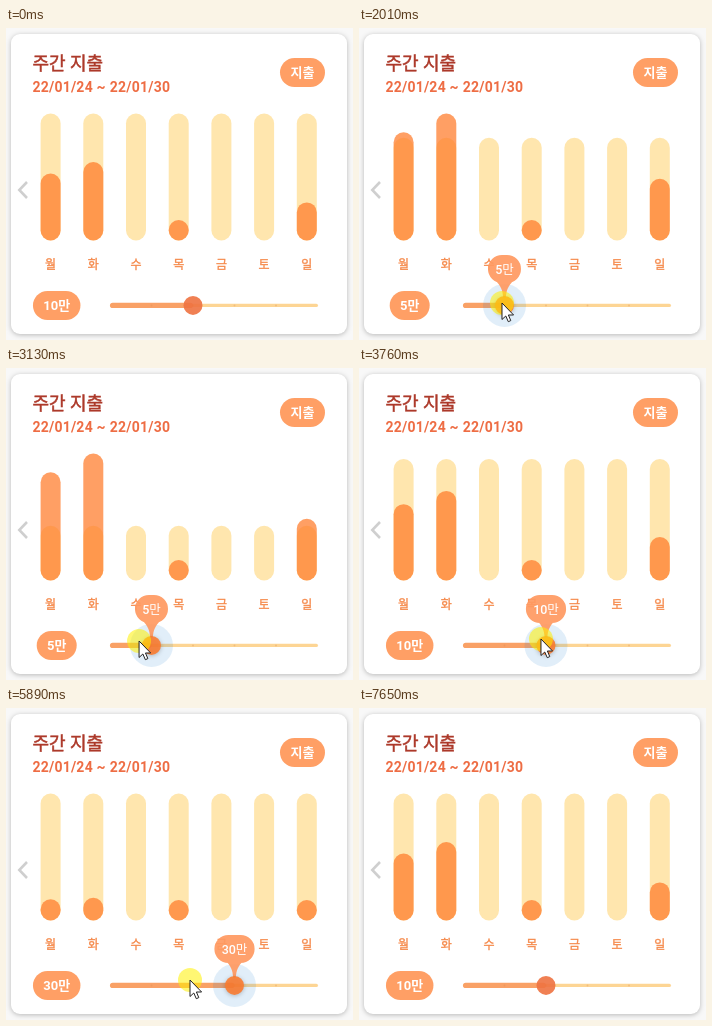
An HTML page that plays this animation: 347 by 312 pixels, repeating every 8.15 s.

```html
<!DOCTYPE html>
<html lang="ko">
<head>
<meta charset="utf-8">
<title>주간 지출</title>
<style>
  html, body { margin: 0; width: 100%; height: 100%; overflow: hidden; background: #f8f8f8; }
  svg { display: block; width: 347px; height: 312px; }
  text { font-family: Roboto, "Noto Sans CJK KR", "Noto Sans CJK", sans-serif; font-weight: 500; }
  .mid { text-anchor: middle; }
  .pill { fill: #ff9f65; }
  .white { fill: #fff; font-size: 13px; }
  .bold { font-weight: 700; }
  .card { fill: #fff; filter: drop-shadow(0 1.5px 2.5px rgba(0, 0, 0, .26)); }
  .title { fill: #ad3a2b; stroke: #ad3a2b; stroke-width: .5px; font-size: 18px; }
  .day { fill: #f58a4c; stroke: #f58a4c; stroke-width: .35px; font-size: 12px; }
  .back { fill: #ffe6ae; }
  .fill { fill: rgba(255, 122, 41, .72); }
  .thumb { fill: #ee7240; fill-opacity: .9; }
  .thumb.held { fill: #f97b30; filter: drop-shadow(0 1px 2px rgba(0, 0, 0, .25)); }
</style>
</head>
<body>
<svg viewBox="0 0 347 312">
  <rect class="card" x="5" y="6" width="336" height="300" rx="9"/>
  <text class="title" x="26.4" y="42">주간 지출</text>
  <text class="bold" x="26.4" y="64" font-size="14" letter-spacing=".23" fill="#ee6d44">22/01/24 ~ 22/01/30</text>
  <rect class="pill" x="274" y="30" width="45" height="29" rx="14.5"/>
  <text class="mid white bold" x="296.5" y="49">지출</text>
  <path d="M21 154L13.3 162L21 170" fill="none" stroke="#cfcfcf" stroke-width="2.6"/>
  <g id="bars"></g>

  <rect id="pill" class="pill" y="263" height="29" rx="14.5"/>
  <text id="limit" class="mid white bold" x="50.7" y="281.7"></text>

  <rect x="104" y="275.7" width="208" height="3.4" rx="1.7" fill="#fdd594"/>
  <rect id="track" x="104" y="274.7" height="5.4" rx="2.7" fill="#f9a166"/>
  <g id="ticks" fill="#d98a4a" opacity=".3"></g>
  <circle id="halo" cy="277.4" fill="#1d7fd0" fill-opacity=".13"/>
  <g id="bubble" opacity=".93">
    <path id="drop" fill="#ff9a62"/>
    <text id="tip" class="mid white" y="-31.7" style="font-size:12.5px"></text>
  </g>
  <circle id="thumb" cy="277.4" r="9.5"/>

  <g id="cursor">
    <circle r="12" fill="#fff000" fill-opacity=".55"/>
    <path d="M0 0V16.5L3.8 13L6.3 18.7L8.8 17.6L6.4 12H11.6Z" fill="#fff" stroke="#222" stroke-linejoin="round"/>
  </g>
</svg>
<script>
const LOOP = 8150, STEP = LOOP / 65;
const PRESS = 690, RELEASE = 6580, LAG = 80, POP = 120, FADE = 300;
const LEFT = 104, GAP = 41.5, FULL = 127, BASE = 212.5, PEAK = 6.18;
const LIMITS = [1, 5, 10, 30, 50, 100];
const SPENT = { 월: 5.27, 화: PEAK, 수: 0, 목: .5, 금: 0, 토: 0, 일: 3 };

// [time, x, y] where the pointer turns or changes speed
const PATH = [[250, 252, 308], [560, 188, 278], [800, 186, 276], [1700, 145, 276], [2006, 143, 275],
  [2290, 118, 274], [2760, 118, 274], [3134, 133, 273], [3440, 166, 272], [3762, 182, 271],
  [5015, 284, 278], [5330, 312, 277], [5517, 308, 275], [5893, 184, 272], [6780, 187, 276], [7640, 240, 330]];

const $ = id => document.getElementById(id);
const mix = (a, b, p) => a + (b - a) * p;
const clamp = (v, lo = 0, hi = 1) => Math.max(lo, Math.min(hi, v));
const set = (el, attrs) => { for (const k in attrs) el.setAttribute(k, attrs[k]); };

function add(parent, tag, attrs) {
  const el = document.createElementNS('http://www.w3.org/2000/svg', tag);
  set(el, attrs);
  return parent.appendChild(el);
}

function pointer(t) {
  const i = PATH.findIndex(p => p[0] > t);
  if (i < 1) return null;
  const [t0, x0, y0] = PATH[i - 1], [t1, x1, y1] = PATH[i], p = (t - t0) / (t1 - t0);
  return [mix(x0, x1, p), mix(y0, y1, p)];
}

// The thumb snaps to the stop nearest the dragging pointer, a little late.
const stopAt = t => Math.round((pointer(clamp(t - LAG, PRESS, RELEASE))[0] - LEFT) / GAP);
const picks = [{ time: -FADE, stop: stopAt(0) }];
for (let t = 0; t < LOOP; t += 5) {
  const stop = stopAt(t);
  if (stop !== picks.at(-1).stop) picks.push({ time: t, stop });
}

const bars = Object.entries(SPENT).map(([name, spent], i) => {
  const x = 44.6 + i * 42.7, box = { x: x - 10, width: 20, rx: 10 };
  const back = add($('bars'), 'rect', { class: 'back', ...box });
  const fill = spent ? add($('bars'), 'rect', { class: 'fill', ...box }) : null;
  add($('bars'), 'text', { class: 'day mid', x, y: 240.7 }).textContent = name;
  return { spent, back, fill };
});
for (let i = 1; i < 5; i++) add($('ticks'), 'circle', { cx: LEFT + i * GAP, cy: 277.4, r: 1 });

const backHeight = limit => FULL * Math.min(1, limit / PEAK);
const fillHeight = (limit, spent) => Math.max(20.5, FULL * spent / Math.max(limit, PEAK));
const stand = (el, h) => set(el, { y: BASE - h, height: h });

function drawBars(from, to, p) {
  for (const { spent, back, fill } of bars) {
    stand(back, mix(backHeight(from), backHeight(to), p));
    if (fill) stand(fill, mix(fillHeight(from, spent), fillHeight(to, spent), p));
  }
}

function drawSlider(stop, held) {
  const label = LIMITS[stop] + '만', extra = label.length - 2;
  const x = LEFT + stop * GAP, w = 40 + extra * 7.5, flat = 2.5 + extra * 3.6;
  set($('pill'), { x: 50.7 - w / 2, width: w });
  $('limit').textContent = $('tip').textContent = label;
  set($('track'), { width: x - LEFT });
  set($('thumb'), { cx: x, class: held ? 'thumb held' : 'thumb' });
  set($('halo'), { cx: x, r: 21.5 * held });
  set($('bubble'), { transform: `translate(${x} 277.4) scale(${held})` });
  set($('drop'), { d: `M${-flat} -50.4H${flat}a14 14 0 0 1 0 28H${-flat}a14 14 0 0 1 0 -28Z
    M9 -25C4 -20 1.6 -15 1.4 -8H-1.4C-1.6 -15 -4 -20 -9 -25Z` });
}

function drawCursor(at) {
  $('cursor').style.display = at ? '' : 'none';
  if (at) set($('cursor'), { transform: `translate(${at})` });
}

function draw(t) {
  const n = picks.findLastIndex(p => p.time <= t);
  const now = picks[n], before = picks[Math.max(0, n - 1)];
  drawBars(LIMITS[before.stop], LIMITS[now.stop], clamp((t - now.time) / FADE));
  drawSlider(now.stop, Math.min(clamp((t - PRESS) / POP), clamp((RELEASE - t) / POP)));
  drawCursor(pointer(t));
}

function tick(now) {
  draw(Math.floor((now % LOOP + 8) / STEP) % 65 * STEP);
  requestAnimationFrame(tick);
}
draw(0);
requestAnimationFrame(tick);
</script>
</body>
</html>
```
